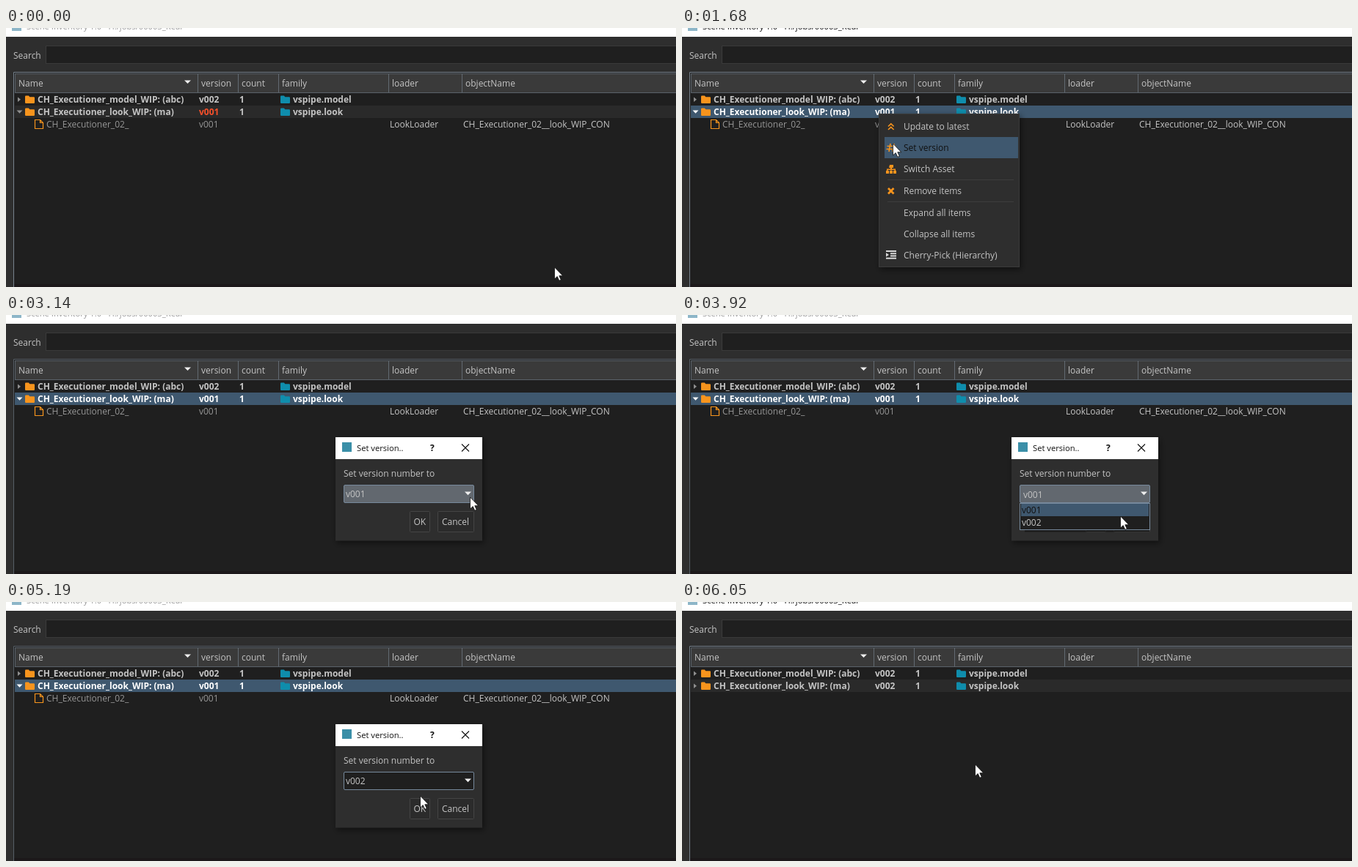
Write an HTML page that moves like this. It is 913 by 354 pixels and loops after 6.28 s.

```html
<!DOCTYPE html>
<html lang="en">
<head>
<meta charset="utf-8">
<title>Set version</title>
<style>
  html, body { margin: 0; width: 100%; height: 100%; overflow: hidden; background: #2e2e2e; }
  svg { display: block; }
  text { font: 12px "Open Sans", "Noto Sans", sans-serif; fill: #c4c4c4; white-space: pre; }
  .bold { font-weight: 700; }
  .caption { font-size: 11.2px; fill: #111; }
  .dim { fill: #969696; }
  .orange { fill: #f7941d; }
  .light { fill: #d8d8d8; }
  .button { fill: #2b2b2b; stroke: #454545; }
</style>
</head>
<body>
<svg id="stage" width="913" height="354" viewBox="0 0 913 354"></svg>
<script>
const LOOP = 6280;
const SELECT = 890, MENU_OPEN = 1060, MENU_CLOSE = 2290;
const DIALOG_OPEN = 2440, COMBO_HOVER = 2990, LIST_OPEN = 3370, LIST_CLOSE = 4410;
const ACCEPT = 5650, RELOAD = 5730;

const text = (x, y, s, attrs = '') => `<text x="${x}" y="${y}" ${attrs}>${s}</text>`;
const rect = (x, y, w, h, fill, attrs = '') =>
  `<rect x="${x}" y="${y}" width="${w}" height="${h}" fill="${fill}" ${attrs}/>`;
const path = (d, attrs = '') => `<path d="${d}" ${attrs}/>`;
const folder = (x, y, fill) =>
  path(`M${x + 1.2} ${y}h3.6l1.6 1.7h5.4q1.2 0 1.2 1.2v6.5q0 1.1-1.2 1.1h-10.6q-1.2 0-1.2-1.1v-8.2q0-1.2 1.2-1.2z`, `fill="${fill}"`);

const columns = [[17, 'Name'], [266, 'version'], [321, 'count'], [376, 'family'], [526, 'loader'], [626, 'objectName']];

function assetRow(y, name, version, family) {
  return folder(26, y - 9.5, '#f7941d') + folder(374, y - 9.5, '#0f8dac') +
    text(43, y, name, 'class="bold"') + text(263, y, version, 'class="bold version"') +
    text(318, y, '1', 'class="bold"') + text(391, y, family, 'class="bold"');
}

function tableView() {
  return rect(0, 0, 913, 12, '#fff') + rect(8, 0, 13, 4, '#8db6c8') +
    text(28, 2, 'Scene Inventory 1.0 - H:/jobs/00003_Real', 'class="caption" id="windowTitle"') +
    text(10, 42, 'Search') + rect(54.5, 24.5, 870, 24, '#1f1f1f', 'stroke="#3a3a3a"') +
    rect(10, 60, 904, 300, '#1f1f1f') + rect(11, 350, 902, 4, '#1c181a') +
    rect(12.5, 62.5, 910, 26, '#3a3a3a', 'stroke="#5a626a"') +
    [261, 316, 371, 521, 621].map(x => rect(x, 63, 1, 25, '#626a72')).join('') +
    columns.map(([x, s]) => text(x, 80, s)).join('') +
    path('M243 71.5h9l-4.5 4.5z', 'fill="#eee"') +
    path('M913 60.5H10.5V354', 'id="frame" fill="none" stroke="#76818c"') +
    path('M16 94.5v6.5l4-3.2z', 'fill="#8f8f8f"') +
    assetRow(102, 'CH_Executioner_model_WIP: (abc)', 'v002', 'vspipe.model') +
    rect(12, 106, 901, 17, '#2a2a2a', 'id="lookBack"') + path('', 'id="branch"') +
    `<g id="lookRow">${assetRow(119, 'CH_Executioner_look_WIP: (ma)', 'v001', 'vspipe.look')}</g>` +
    `<g id="child">` +
      path('M39.5 125.5h7l4 4v8h-11zM46.5 125.5v4h4', 'fill="none" stroke="#f7941d" stroke-width="1.2"') +
      text(55, 136, 'CH_Executioner_02_', 'class="dim"') + text(263, 136, 'v001', 'class="dim"') +
      text(523, 136, 'LookLoader') + text(623, 136, 'CH_Executioner_02__look_WIP_CON') +
    `</g>`;
}

function menuView() {
  const items = [[139, 'Update to latest'], [168, 'Set version'], [197, 'Switch Asset'], [227, 'Remove items'],
    [257, 'Expand all items'], [286, 'Collapse all items'], [315, 'Cherry-Pick (Hierarchy)']];
  const line = 'fill="none" stroke="#f7941d" stroke-width="1.6"';
  return `<g id="menu"><g filter="url(#shadow)">${rect(268, 117, 192, 210, '#2e2e2e')}</g>` +
    rect(268.5, 117.5, 191, 209, 'none', 'stroke="#3b3b3b"') +
    rect(276, 149, 182, 29, '#3f586f', 'id="menuHot"') +
    rect(280, 207, 172, 1, '#3d3d3d') + rect(280, 237, 172, 1, '#3d3d3d') +
    path('M281 134.5l3.8-3.6 3.8 3.6M281 139l3.8-3.6 3.8 3.6', line) +
    path('M284 158l-2 11M289 158l-2 11M279.5 161.5h12M278.5 165.5h12', line) +
    path('M283 187h5v4h-2v1.5h5v2.5h1v4h-4v-4h1.5v-1h-4v1h1.5v4h-4v-4h1.5v-1h-4v1h1.5v4h-4v-4h1v-2.5h5V191h-2z', 'class="orange"') +
    path('M281 219l7.5 7.5M288.5 219l-7.5 7.5', 'stroke="#f7941d" stroke-width="2.8"') +
    path('M278 304h14v2h-14zM284 307.3h8v2h-8zM284 310.5h8v2h-8zM278 313.7h14v2h-14zM278 307.2l4 2.8-4 2.8z', 'class="light"') +
    items.map(([y, s]) => text(302, y, s, 'class="item"')).join('') + `</g>`;
}

function dialogView() {
  return `<g id="dialog"><g filter="url(#shadow)">${rect(449, 167, 200, 141.5, '#2e2e2e')}</g>` +
    rect(449, 167, 200, 30, '#fff') + rect(458, 174, 13, 13, '#3b8fa8') +
    text(478, 186, 'Set version..', 'class="caption"') +
    text(578, 186, '?', 'class="bold" style="fill:#111"') +
    path('M621 176.5l10 10M631 176.5l-10 10', 'stroke="#111" stroke-width="1.1"') +
    text(460, 221, 'Set version number to') +
    rect(550.5, 268.5, 27, 28, '', 'class="button" rx="1"') + text(555.5, 287, 'OK') +
    rect(588.5, 268.5, 49, 28, '', 'class="button" rx="1"') + text(594, 287, 'Cancel') +
    rect(460.5, 232.5, 177, 24, '#1f1f1f', 'id="combo" stroke="#76899c" rx="1.5"') +
    text(463, 249, 'v001', 'id="comboText"') + path('M625 241.5h9l-4.5 4.7z', 'fill="#eee"') +
    `<g id="list">` +
      rect(467, 294, 170, 2.5, '#111', 'opacity=".6"') +
      rect(460.5, 257.5, 177, 36, '#1f1f1f', 'stroke="#76899c"') +
      rect(462, 258, 174, 17, '#3f586f', 'id="listHot"') +
      text(463, 271, 'v001', 'class="entry"') + text(463, 288, 'v002', 'class="entry"') +
    `</g></g>`;
}

document.getElementById('stage').innerHTML =
  `<defs><filter id="shadow" x="-20%" y="-20%" width="140%" height="140%">
    <feDropShadow dx="2" dy="3" stdDeviation="4" flood-color="#000" flood-opacity=".5"/></filter></defs>` +
  tableView() + menuView() + dialogView() +
  path('M-.5 0V16L3.2 12.6L5.8 18.3L8.3 17.2L5.8 11.7H10.8Z', 'id="cursor" fill="#fff" stroke="#111" stroke-width=".8"');

const $ = id => document.getElementById(id);
const all = selector => [...document.querySelectorAll(selector)];
const lookTexts = all('#lookRow text'), menuItems = all('.item'), entries = all('.entry');
const lookVersion = document.querySelector('#lookRow .version');

// Each move: first step, last step, step count, waypoints [share of move, x, y].
const moves = [
  [70, 590, 8, [[0, 748, 327], [.25, 655, 282], [.55, 420, 180], [.8, 292, 128], [1, 268, 117]]],
  [1370, 1680, 5, [[0, 268, 117], [.4, 276, 132], [1, 288, 158]]],
  [2290, 2900, 9, [[0, 288, 158], [.444, 304, 166], [.7, 500, 220], [1, 645, 260]]],
  [2990, 3600, 9, [[0, 645, 260], [.4, 631, 247], [1, 629, 246]]],
  [3760, 4160, 6, [[0, 629, 246], [.5, 598, 275], [1, 606, 279]]],
  [4650, 5270, 9, [[0, 606, 279], [.3, 560, 247], [.55, 524, 243], [.889, 565, 265], [1, 575, 279]]],
  [5370, 5370, 1, [[0, 575, 279], [1, 576, 281]]],
  [5650, 6050, 6, [[0, 576, 281], [.5, 480, 246], [1, 400, 222]]]
];

function along(points, share) {
  const i = Math.max(1, points.findIndex(p => p[0] >= share - .001));
  const [a, b] = [points[i - 1], points[i]];
  const k = Math.min(1, (share - a[0]) / (b[0] - a[0]));
  return [1, 2].map(n => Math.round(a[n] + (b[n] - a[n]) * k));
}

function cursorAt(t) {
  let spot = [748, 327];
  for (const [start, end, count, points] of moves) {
    if (t < start) break;
    const gap = count > 1 ? (end - start) / (count - 1) : 1;
    const step = Math.min(count, 1 + Math.floor((t - start) / gap + .02));
    spot = along(points, step / count);
  }
  return spot;
}

const show = (id, on) => { $(id).style.display = on ? '' : 'none'; };
const stepped = (t, start, values) => values[Math.min(values.length - 1, Math.floor((t - start) / 76))];

function drawTable(t) {
  const selected = t >= SELECT && t < RELOAD, reloaded = t >= RELOAD;
  const active = t >= SELECT && (t < DIALOG_OPEN || t >= ACCEPT);
  $('windowTitle').style.fill = active ? '#111' : '#999';
  $('frame').setAttribute('stroke', t >= DIALOG_OPEN && t < ACCEPT ? '#565e66' : '#76818c');
  $('lookBack').setAttribute('fill', selected ? '#3f586f' : '#2a2a2a');
  $('branch').setAttribute('d', reloaded ? 'M16 111.5v6.5l4-3.2z' : 'M14.5 112.5h8l-4 4.2z');
  $('branch').setAttribute('fill', selected ? '#fff' : '#8f8f8f');
  lookTexts.forEach(el => { el.style.fill = selected ? '#fff' : ''; });
  lookVersion.textContent = reloaded ? 'v002' : 'v001';
  if (t < SELECT) lookVersion.style.fill = '#f8502a';
  show('child', !reloaded);
}

function drawMenu(t, y) {
  show('menu', t >= MENU_OPEN && t < MENU_CLOSE);
  const hot = y > 149 ? 1 : y > 122 ? 0 : -1;
  show('menuHot', hot >= 0);
  $('menuHot').setAttribute('y', 120 + 29 * hot);
  menuItems.forEach((el, i) => { el.style.fill = i === hot ? '#111' : ''; });
}

function drawDialog(t, y) {
  const opacity = t < DIALOG_OPEN ? 0
    : t < ACCEPT ? stepped(t, DIALOG_OPEN, [.35, .8, 1])
    : stepped(t, ACCEPT, [.7, .25, 0]);
  const scale = .95 + .05 * opacity;
  show('dialog', opacity > 0);
  $('dialog').style.opacity = opacity;
  $('dialog').setAttribute('transform', `translate(549 238) scale(${scale}) translate(-549 -238)`);

  const hover = t >= COMBO_HOVER && t < LIST_CLOSE;
  const open = t >= LIST_OPEN && t < LIST_CLOSE;
  $('combo').setAttribute('fill', hover ? '#62686f' : '#1f1f1f');
  $('comboText').textContent = t >= LIST_CLOSE ? 'v002' : 'v001';
  $('comboText').setAttribute('transform', open ? 'translate(2 1)' : '');
  show('list', open);
  $('list').style.opacity = open ? stepped(t, LIST_OPEN, [.4, .8, 1]) : 0;
  const hot = y > 275 ? 1 : 0;
  $('listHot').setAttribute('y', 258 + 17 * hot);
  entries.forEach((el, i) => { el.style.fill = i === hot ? '#111' : ''; });
}

function frame() {
  const t = performance.now() % LOOP;
  const [x, y] = cursorAt(t);
  drawTable(t);
  drawMenu(t, y);
  drawDialog(t, y);
  $('cursor').setAttribute('transform', `translate(${x} ${y})`);
  requestAnimationFrame(frame);
}
frame();
</script>
</body>
</html>
```
